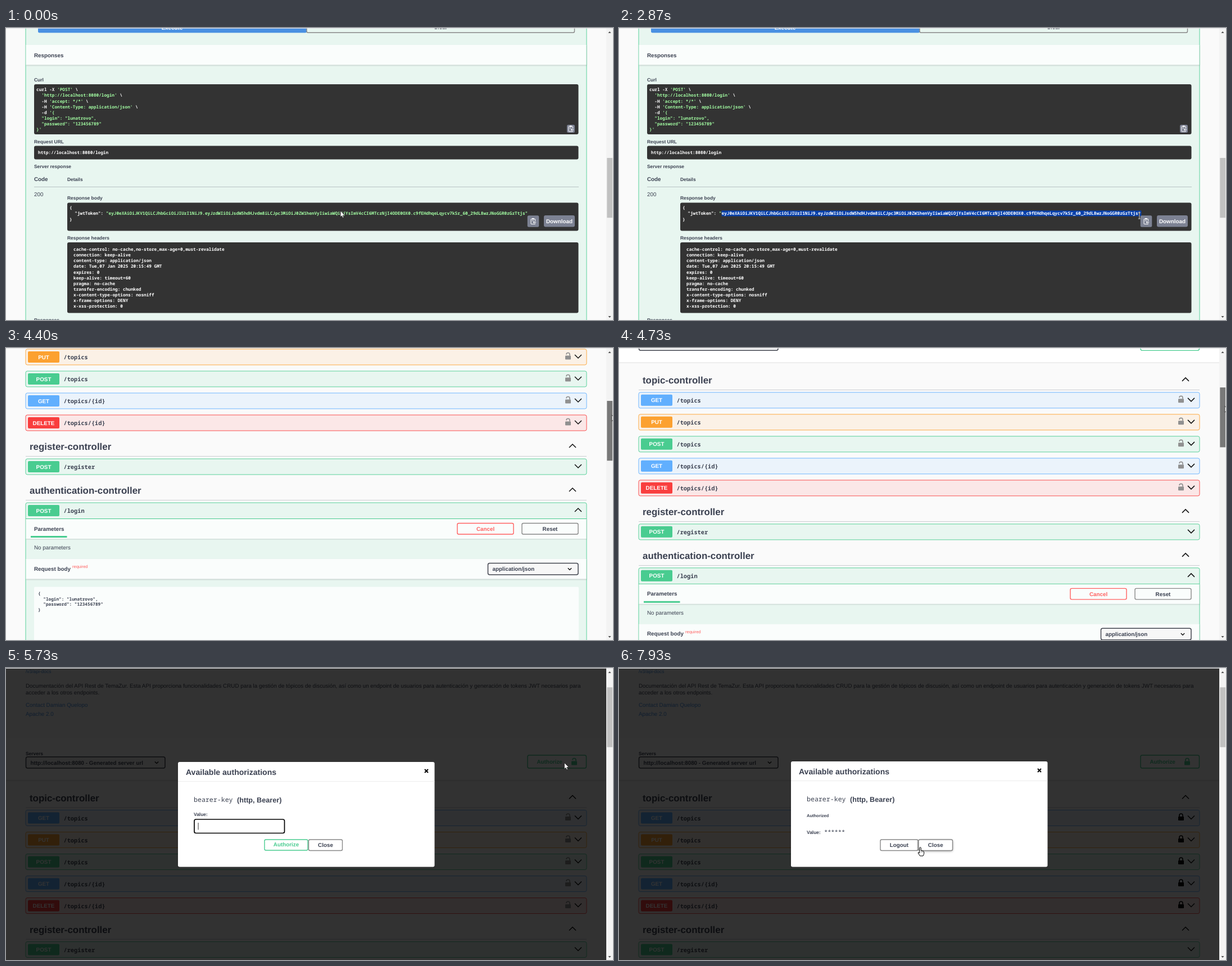
Animation of 1080x519 px, one loop 8 s. Source, as an HTML page with a canvas:

```html
<!DOCTYPE html>
<html lang="es">
<head>
<meta charset="utf-8">
<title>API docs</title>
<style>
html, body { margin: 0; width: 100%; height: 100%; overflow: hidden; background: #fafafa; }
canvas { display: block; }
</style>
</head>
<body>
<canvas id="stage" width="1080" height="519"></canvas>
<script>
const ctx = document.getElementById('stage').getContext('2d');
const LOOP = 8000, FPS = 15;
const SANS = '"Liberation Sans", Arial, sans-serif';
const MONO = '"Noto Sans Mono", "DejaVu Sans Mono", monospace';
const INK = '#3b4151', LINK = '#4990e2', GREEN = '#49cc90', RED = '#ff6060';
const SMALL = 8.43, BODY = 9.84, CODE = 7.73, ADVANCE = CODE * 0.6;
const METHOD = { GET: '#61affe', PUT: '#fca130', POST: GREEN, DELETE: '#f93e3e' };
const TOKEN = 'eyJ0eXAiOiJKV1QiLCJhbGciOiJIUzI1NiJ9.' +
  'eyJzdWIiOiJsdW5hdHJvdm8iLCJpc3MiOiJ0ZW1henVyIiwiaWQiOjYsImV4cCI6MTczNjI4ODE0OX0.' +
  'c9fEHdhqeLqycv7kSr_60_29dL8wzJNoGGR0zGzTtjs';
const HEADERS = ['cache-control: no-cache,no-store,max-age=0,must-revalidate', 'connection: keep-alive',
  'content-type: application/json', 'date: Tue,07 Jan 2025 20:15:49 GMT', 'expires: 0',
  'keep-alive: timeout=60', 'pragma: no-cache', 'transfer-encoding: chunked',
  'x-content-type-options: nosniff', 'x-frame-options: DENY', 'x-xss-protection: 0'];

const SCROLL = [[4180, 949], [4267, 700], [4333, 450], [4400, 284], [4467, 250], [4620, 250],
  [4800, 120], [4933, 25], [5000, 0], [5200, -5.5]];
const POINTER = [[0, 595, 325], [250, 500, 340], [520, 330, 312], [867, 198, 330], [1400, 185, 330],
  [1560, 185, 330], [1667, 235, 330], [1800, 358, 330], [2130, 850, 330], [2230, 928, 334],
  [2400, 930, 356], [2480, 930, 354], [2670, 927, 343], [2930, 925.5, 330.5], [3420, 925.5, 330.5],
  [3950, 1077, 285], [4133, 1078, 272], [4400, 1078, 119], [4667, 1078, 110], [5000, 1078, 76],
  [5200, 1077, 74], [5400, 1010, 155], [5533, 993.5, 168.5], [5800, 993.5, 168.5], [6270, 560, 290],
  [6700, 560, 290], [7000, 499, 311], [7270, 497, 311], [7420, 478, 308], [7670, 570, 316], [7930, 536, 318.5]];
const SELECT_START = 1600, MODAL_AT = 5600, PASTE_AT = 6600, AUTH_AT = 7200;

function track(keys, t, col = 1) {
  if (t <= keys[0][0]) return keys[0][col];
  for (let i = 1; i < keys.length; i++) {
    const a = keys[i - 1], b = keys[i];
    if (t <= b[0]) return a[col] + (b[col] - a[col]) * (t - a[0]) / (b[0] - a[0]);
  }
  return keys[keys.length - 1][col];
}

// y is the middle of the capitals
function text(s, x, y, { size = BODY, weight = 700, color = INK, font = SANS, align = 'left' } = {}) {
  ctx.font = `${weight} ${size}px ${font}`;
  ctx.textAlign = align;
  ctx.fillStyle = color;
  ctx.fillText(s, x, y + size * 0.358);
}
const mono = (s, x, y, opts) => text(s, x, y, { size: CODE, font: MONO, ...opts });
const label = (s, x, y) => text(s, x, y, { size: SMALL });

// parts alternate between plain and string colour
function code(x, y, ...parts) {
  parts.forEach((s, i) => {
    mono(s, x, y, { color: i % 2 ? '#a2fca2' : '#fff' });
    x += s.length * ADVANCE;
  });
}

function rect(x0, y0, x1, y1, fill) {
  ctx.fillStyle = fill;
  ctx.fillRect(x0, y0, x1 - x0, y1 - y0);
}

function box(x0, y0, x1, y1, { r = 3, fill, stroke, line = 1.2 } = {}) {
  ctx.beginPath();
  ctx.roundRect(x0, y0, x1 - x0, y1 - y0, r);
  if (fill) { ctx.fillStyle = fill; ctx.fill(); }
  if (stroke) { ctx.strokeStyle = stroke; ctx.lineWidth = line; ctx.stroke(); }
}

function poly(points, { fill, stroke, line = 1.3, close = false }) {
  ctx.beginPath();
  points.forEach(([x, y]) => ctx.lineTo(x, y));
  if (close) ctx.closePath();
  if (fill) { ctx.fillStyle = fill; ctx.fill(); }
  if (stroke) { ctx.strokeStyle = stroke; ctx.lineWidth = line; ctx.stroke(); }
}

function shadowed(draw, color = 'rgba(0,0,0,.15)', blur = 2) {
  ctx.save();
  ctx.shadowColor = color;
  ctx.shadowBlur = blur;
  ctx.shadowOffsetY = 1;
  draw();
  ctx.restore();
}

const band = (y0, y1) => shadowed(() => rect(35.5, y0, 1032.5, y1, '#fafdfc'));
const chevron = (x, y, up, w = 6, line = 1.5) => {
  const d = up ? -w / 2 : w / 2;
  poly([[x - w, y - d], [x, y + d], [x + w, y - d]], { stroke: '#111', line });
};

function button(s, x0, y0, x1, y1, color = INK, stroke = '#888', dy = 0) {
  box(x0, y0, x1, y1, { r: 2.5, fill: '#fff0', stroke, line: 1.4 });
  text(s, (x0 + x1) / 2, (y0 + y1) / 2 + dy, { color, align: 'center' });
}

function dropdown(s, x0, y0, x1, y1) {
  box(x0, y0, x1, y1, { fill: '#f7f7f7', stroke: '#41444e', line: 1.5 });
  text(s, x0 + 8, (y0 + y1) / 2);
  chevron(x1 - 15, (y0 + y1) / 2, false, 3.2, 1.4);
}

function lock(x, y, color, open) {
  box(x - 5, y - 1, x + 5, y + 6, { r: 1, fill: color });
  ctx.beginPath();
  if (!open) ctx.moveTo(x - 3, y - 1);
  ctx.arc(x, y - 3, 3, Math.PI, 0);
  ctx.lineTo(x + 3, y - 1);
  ctx.strokeStyle = color;
  ctx.lineWidth = 1.7;
  ctx.stroke();
}

function heading(s, y) {
  text(s, 42, y, { size: 16.87 });
  chevron(1008, y - 1, true);
  rect(35, y + 17.2, 1033, y + 18, 'rgba(59,65,81,.3)');
}

function row(y, method, path, lockState, bottom = y + 14) {
  const color = METHOD[method];
  box(35, y - 14, 1033, bottom, { fill: color + '1a', stroke: color, line: 0.9 });
  box(39, y - 10, 95, y + 10, { r: 2, fill: color });
  text(method, 67, y, { color: '#fff', align: 'center' });
  mono(path, 102.5, y + 0.5, { size: 10.3 });
  if (lockState) lock(1000, y - 1.5, lockState === 'open' ? '#909090' : '#000', lockState === 'open');
  chevron(1018, y - 1, bottom > y + 14);
}

function clipboard(x, y, size) {
  box(x - size / 2, y - size / 2, x + size / 2, y + size / 2, { r: 2.5, fill: '#7d8293' });
  box(x - 4, y - 4, x + 3.5, y + 5, { r: 0.5, stroke: '#fff', line: 1 });
  rect(x - 2, y - 5.5, x + 1.5, y - 3, '#fff');
  rect(x - 2.5, y - 1.5, x + 1, y - 0.7, '#fff');
  rect(x + 1, y, x + 5.5, y + 3.5, '#7d8293');
  poly([[x + 5, y + 1.8], [x, y + 1.8]], { stroke: '#fff', line: 1.1 });
  poly([[x + 2, y], [x, y + 1.8], [x + 2, y + 3.6]], { stroke: '#fff', line: 1 });
}

function drawTop(authed) {
  const plain = (s, y, color = INK) => text(s, 35, y, { weight: 400, color });
  text('/v3/api-docs', 35, 0.5, { size: SMALL, weight: 400, color: LINK });
  plain('Documentación del API Rest de TemaZur. Esta API proporciona funcionalidades CRUD para la gestión de tópicos de discusión, así como un endpoint de usuarios para autenticación y generación de tokens JWT necesarios para', 26);
  plain('acceder a los otros endpoints.', 38);
  plain('Contact Damian Quelopo', 60, LINK);
  plain('Apache 2.0', 76, LINK);

  shadowed(() => rect(-5, 118.5, 1075, 193.5, '#fff'));
  label('Servers', 35, 146);
  dropdown('http://localhost:8080 - Generated server url', 35.5, 152.5, 283, 172.5);
  box(928, 149.5, 1032.5, 172.5, { stroke: GREEN, line: 1.4 });
  text('Authorize', 944.5, 161, { color: GREEN });
  lock(1011, 161, GREEN, !authed);

  const state = authed ? 'closed' : 'open';
  heading('topic-controller', 225);
  row(261, 'GET', '/topics', state);
  row(300, 'PUT', '/topics', state);
  row(339, 'POST', '/topics', state);
  row(378, 'GET', '/topics/{id}', state);
  row(417, 'DELETE', '/topics/{id}', state);
  heading('register-controller', 459);
  row(495, 'POST', '/register');
  heading('authentication-controller', 537);
  row(573, 'POST', '/login', null, 1600);
}

function drawLoginForm() {
  rect(35, 587, 1033, 588, GREEN);
  band(588, 623);
  text('Parameters', 50, 605);
  rect(44, 618, 108.5, 621, GREEN);
  button('Cancel', 803, 595.5, 903, 615, RED, RED);
  button('Reset', 918, 595.5, 1018, 615);
  text('No parameters', 50, 638.5, { weight: 400 });
  band(659, 694.5);
  text('Request body', 50, 676);
  text('required', 118, 672.5, { size: 7.5, weight: 400, color: RED });
  dropdown('application/json', 857.5, 666.5, 1018, 687);
  box(50, 708.5, 1019, 900, { r: 2, fill: '#fafdfc' });
  ['{', '  "login": "lunatrovo",', '  "password": "123456789"', '}']
    .forEach((s, i) => mono(s, 57, 720 + i * 9.8));
  box(57, 937, 535, 957.5, { r: 2.5, fill: LINK });
  text('Execute', 295.5, 948, { color: '#fff', align: 'center' });
  button('Clear', 535, 937, 1011.5, 957.2, INK, '#888', 0.8);
}

function selection(t) {
  if (t < SELECT_START) return null;
  const y = track(POINTER, Math.min(t, 2930) - 67, 2), x = track(POINTER, Math.min(t, 2930) - 67, 1);
  if (y > 336) return { end: 176, brace: y > 345 };
  return { end: Math.max(15, Math.min(175, Math.round((x - 36 * (t < 1900) - 113) / ADVANCE) + (t < 1900 ? 7 : 0))) };
}

function drawSelection(sel) {
  const line = '  "jwtToken": "' + TOKEN + '"';
  const highlight = (s, col, y) => {
    const x = 113 + col * ADVANCE;
    rect(x, y - 5, x + s.length * ADVANCE, y + 5, '#0740ab');
    mono(s, x, y, { color: '#fff' });
  };
  if (sel.end > 15) highlight(line.slice(15, sel.end), 15, 329.5);
  if (sel.brace) highlight('}', 0, 340);
}

function drawResponse(t) {
  band(30, 65.5);
  text('Responses', 50, 48);
  label('Curl', 50, 91.5);
  const dark = (x, y0, y1) => box(x, y0, 1018.5, y1, { fill: '#333' });
  dark(50, 100, 189);
  [['curl -X ', "'POST'", ' \\'], ['  ', "'http://localhost:8080/login'", ' \\'],
    ['  -H ', "'accept: */*'", ' \\'], ['  -H ', "'Content-Type: application/json'", ' \\'],
    ['  -d ', "'{"], ['', '  "login": "lunatrovo",'], ['', '  "password": "123456789"'], ['', "}'"]]
    .forEach((parts, i) => code(54, 109.5 + i * 10.13, ...parts));
  clipboard(1005, 179, 14);
  label('Request URL', 50, 201.5);
  dark(50, 209.5, 233.5);
  code(57, 221.5, 'http://localhost:8080/login');
  label('Server response', 50, 245.5);
  text('Code', 50, 268);
  label('Details', 109, 268.5);
  rect(50, 282.2, 1019, 283, 'rgba(59,65,81,.35)');
  text('200', 50, 295.5, { weight: 400 });

  label('Response body', 109, 302);
  dark(109, 310.5, 360.5);
  code(113, 319.5, '{');
  code(113, 329.5, '  "jwtToken": ', '"' + TOKEN + '"');
  code(113, 340, '}');
  const sel = selection(t);
  if (sel) drawSelection(sel);
  clipboard(938, 343.5, 20.5);
  box(957, 333, 1012, 353.5, { fill: '#7d8293' });
  text('Download', 984.5, 343, { color: '#fff', align: 'center' });

  label('Response headers', 109, 372.5);
  dark(109, 381, 506.5);
  HEADERS.forEach((s, i) => code(120, 393.3 + i * 10.13, s));
  label('Responses', 50, 518.5);
}

function drawModal(t, authed, px) {
  rect(0, 0, 1068, 519, 'rgba(0,0,0,.8)');
  const top = authed ? 166 : 167;
  box(306, top, 762.5, 353.5, { fill: '#fff' });
  text('Available authorizations', 320, top + 17.5, { size: 14.06 });
  rect(306, top + 34.3, 762.5, top + 35, '#e4e4e4');
  const cy = top + 16;
  poly([[745, cy - 3], [751, cy + 3]], { stroke: '#000', line: 2 });
  poly([[745, cy + 3], [751, cy - 3]], { stroke: '#000', line: 2 });
  mono('bearer-key', 334, top + 67, { size: 11.6, weight: 500 });
  text('(http, Bearer)', 411, top + 67, { size: 12.65 });

  if (authed) {
    text('Authorized', 334, 262.5, { size: 7.53 });
    label('Value:', 334, 291.5);
    mono('******', 365, 291.5, { size: 10.3, weight: 400 });
    button('Logout', 465, 305, 532, 324.5);
    if (px > 532) shadowed(() => box(533, 305, 593.5, 324.5, { fill: '#fff' }), 'rgba(0,0,0,.4)', 4);
    button('Close', 533, 305, 593.5, 324.5);
    return;
  }
  label('Value:', 334, 259.5);
  box(335, 269, 495.5, 293.5, { stroke: '#000', line: 1.7 });
  const pasted = t >= PASTE_AT;
  if (pasted) {
    ctx.save();
    ctx.beginPath();
    ctx.rect(341.5, 270, 147.5, 22);
    ctx.clip();
    text(TOKEN, 488, 281, { weight: 400, align: 'right' });
    ctx.restore();
  }
  if (t % 1000 > 500 || t < 6000) rect(pasted ? 488.5 : 341.6, 275, pasted ? 489.3 : 342.5, 287.5, '#222');
  button('Authorize', 460, 305, 537, 324, GREEN, GREEN, -0.8);
  button('Close', 538.5, 305, 598.5, 324.5);
}

function drawScrollbar(scroll, active) {
  rect(1068, 0, 1080, 519, '#f3f3f3');
  const y = 35.5 + scroll / 4.855;
  rect(1069.3, y, 1079, y + 106.3, active ? '#787878' : '#c1c1c1');
  poly([[1071.5, 9], [1074, 6], [1076.5, 9]], { fill: '#505050' });
  poly([[1071.5, 512], [1074, 515], [1076.5, 512]], { fill: '#505050' });
}

function drawPointer(t, x, y) {
  if ((t >= 3200 && t < 3465) || (t >= PASTE_AT && t < 6700)) return;
  ctx.save();
  ctx.translate(x, y);
  if (t >= 860 && t < 3530) {
    const beam = [[[-2, -5], [2, -5]], [[0, -5], [0, 5.5]], [[-2, 5.5], [2, 5.5]]];
    beam.forEach(p => poly(p, { stroke: '#222', line: 2 }));
    beam.forEach(p => poly(p, { stroke: '#ddd', line: 1 }));
  } else if (t >= 6950 || (t >= 5450 && t < MODAL_AT)) {
    poly([[-1.2, 1], [0, 0], [1.3, 1], [1.3, 6], [3.5, 6], [5.5, 7], [6.6, 8.5], [6.6, 12], [5, 15.5],
      [-0.5, 15.5], [-3.8, 10.5], [-3.3, 9], [-1.2, 10.5]],
      { fill: '#fff', stroke: '#000', line: 1, close: true });
    [2, 4].forEach(dx => poly([[dx, 7], [dx, 9]], { stroke: '#000', line: 0.7 }));
  } else {
    poly([[0, 0], [0, 11], [2.5, 8.8], [4.2, 12.4], [6, 11.5], [4.4, 8], [7.8, 7.8]],
      { fill: '#fff', stroke: '#222', line: 0.8, close: true });
  }
  ctx.restore();
}

function draw(t) {
  const scroll = track(SCROLL, t), px = track(POINTER, t, 1), py = track(POINTER, t, 2);
  const authed = t >= AUTH_AT;
  rect(0, 0, 1080, 519, '#fafafa');
  ctx.save();
  ctx.translate(0, -scroll);
  drawTop(authed);
  drawLoginForm();
  ctx.translate(0, 949);
  drawResponse(t);
  ctx.restore();
  if (t >= MODAL_AT) drawModal(t, authed, px);
  drawScrollbar(scroll, px > 1068);
  rect(0, 0, 1080, 1, '#e3e3e6');
  drawPointer(t, px, py);
}

ctx.textRendering = 'geometricPrecision';
const start = performance.now();
function tick() {
  const t = (performance.now() - start) % LOOP;
  draw(Math.floor((t + 5) * FPS / 1000) * 1000 / FPS);
  requestAnimationFrame(tick);
}
tick();
</script>
</body>
</html>
```
